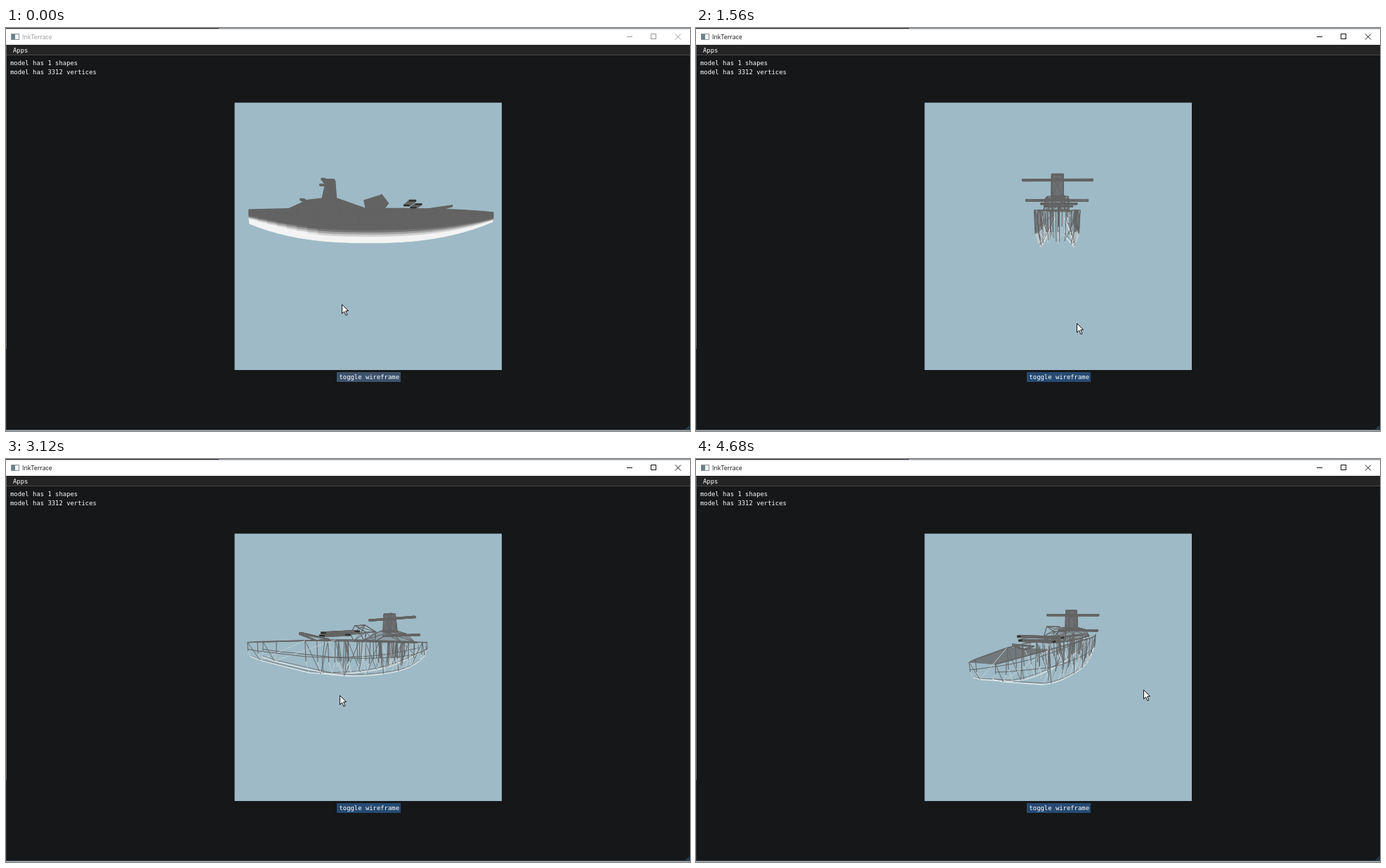
Write an HTML page with a canvas that moves like this. It is 974 px wide and 575 px high and loops after 4.8 s.

```html
<!DOCTYPE html>
<html lang="en">
<head>
<meta charset="utf-8">
<title>Model viewer</title>
<style>
html, body { margin: 0; width: 100%; height: 100%; overflow: hidden; background: #151718; }
canvas { display: block; width: 974px; height: 575px; }
</style>
</head>
<body>
<canvas id="stage" width="974" height="575"></canvas>
<script>
const ctx = document.getElementById('stage').getContext('2d');
const LOOP = 4800, STEP = 120, WIRE_AT = 1320;
const VIEW = [325.5, 106.5, 380.5, 381.5];
const CAM = 400, RAD = Math.PI / 180;
const STERN = -166, BOW = 172;
const GREY = '#636363', DARK = '#2b2b2b', WHITE = '#eef1f1', PALE = '#c3ced2', SKY = '#9ebac6';
const MONO = '8.9px "DejaVu Sans Mono", monospace';
const TITLE = '8.8px "Open Sans", sans-serif';

// Key moments of the drag: time, yaw, pitch, cursor x, cursor y
const KEYS = [
  [0, 0, 0, 478, 394], [960, 63, 4, 544, 326], [1320, 78, 5, 522, 496], [1560, 89, 5.5, 542, 421],
  [2640, 260, 0, 509, 337], [3600, 204, 8, 440, 337], [3840, 160, 9, 380, 412],
  [4200, 230, 10, 560, 351], [4680, 248, 10.5, 637, 329]
];

const clamp = v => Math.max(0, Math.min(1, v));
const mix = (a, b, k) => a + (b - a) * k;
const range = (n, f) => Array.from({ length: n }, (_, i) => f(i));

function poseAt(t) {
  const next = Math.max(1, KEYS.findIndex(k => k[0] >= t));
  const a = KEYS[next - 1], b = KEYS[next], k = (t - a[0]) / (b[0] - a[0]);
  return a.map((v, i) => mix(v, b[i], k));
}

// Point on the hull at length x, drop 0 (deck) to 1 (keel), side -1 to 1
function skin(x, drop, side) {
  const u = x / 170, far = Math.abs(u);
  const deck = -37 + 4 * Math.max(0, u) ** 3;
  const keel = 9 - 28 * far ** 2.4;
  const half = 28 * (1 - (u < 0 ? .7 : .5) * far ** 3);
  return [x, mix(deck, keel, drop), side * half * (1 - .25 * drop ** 4)];
}

// Flat outlines in x, y, pulled out to both sides
const part = (half, pts, fill = 0) => ({ half, pts, fill });
const bar = (x, y, half, len = 5) => part(half, [[x, y], [x + len, y], [x + len, y + 2], [x, y + 2]]);
const WINGS = [[54, -48, 29], [63, -44, 22]];
const PARTS = [
  part(13, [[-112, -37], [-84, -50], [-48, -54], [0, -37]], .2),
  part(7, [[-65, -52], [-59, -80], [-48, -80], [-46, -53]], .6),
  part(9, [[-6, -50], [19, -58], [28, -46], [21, -37], [-3, -37]]),
  part(2, [[78, -38], [119, -44], [119, -42], [97, -36]]),
  bar(-69, -74, 2, 10), bar(-60, -74, 42), bar(-89, -49, 34),
  ...WINGS.map(([x, y, half]) => bar(x, y, half, 9))
];

function faces({ half, pts }) {
  const [a, b] = [-half, half].map(z => pts.map(([x, y]) => [x, y, z]));
  const sides = a.map((p, i) => {
    const j = (i + 1) % a.length;
    return [p, a[j], b[j], b[i]];
  });
  return [a, b, ...sides];
}

function camera(yaw, pitch) {
  const c = Math.cos(yaw * RAD), s = Math.sin(yaw * RAD);
  const cp = Math.cos(pitch * RAD), sp = Math.sin(pitch * RAD);
  return ([x, y, z]) => {
    const depth = z * c - x * s, d = depth * cp - y * sp, k = CAM / (CAM - d);
    return [516 + (x * c + z * s) * k, 297 + (y * cp + depth * sp) * k, d];
  };
}

function trace(pts) {
  ctx.beginPath();
  pts.forEach(p => ctx.lineTo(p[0], p[1]));
  ctx.closePath();
}

function face(pts, color, alpha = 1) {
  trace(pts);
  ctx.globalAlpha = alpha;
  ctx.fillStyle = ctx.strokeStyle = color;
  ctx.lineWidth = .6;
  ctx.fill();
  ctx.stroke();
  ctx.globalAlpha = 1;
}

function line(cam, a, b, color, width = 1) {
  const p = cam(a), q = cam(b);
  ctx.beginPath();
  ctx.moveTo(p[0], p[1]);
  ctx.lineTo(q[0], q[1]);
  ctx.strokeStyle = color;
  ctx.lineWidth = width;
  ctx.stroke();
}

function shade(x, drop) {
  const edge = mix(.42, .6, clamp((x - STERN) / 100));
  const v = Math.round(mix(99, 244, clamp((drop - edge) / .2)));
  return `rgb(${v},${v},${v})`;
}

function drawSolid(cam) {
  for (const p of PARTS) for (const f of faces(p)) face(f.map(cam), GREY);

  const quads = [], rows = 16, cols = 24;
  const add = (pts, color) => {
    const q = pts.map(cam);
    quads.push({ q, color, z: q.reduce((sum, v) => sum + v[2], 0) });
  };
  const across = (x, nx, u, v) => [skin(x, u, -1), skin(nx, v, -1), skin(nx, v, 1), skin(x, u, 1)];
  for (let r = 0; r < rows; r++) {
    const u = r / rows, v = (r + 1) / rows;
    for (const x of [STERN, BOW]) add(across(x, x, u, v), shade(x, u));
    for (let c = 0; c < cols; c++) {
      const x = mix(STERN, BOW, c / cols), nx = mix(STERN, BOW, (c + 1) / cols);
      for (const s of [-1, 1])
        add([skin(x, u, s), skin(nx, u, s), skin(nx, v, s), skin(x, v, s)], shade(x, u));
      if (!r) {
        add(across(x, nx, 0, 0), GREY);
        add(across(x, nx, 1, 1), WHITE);
      }
    }
  }
  quads.sort((a, b) => a.z - b.z).forEach(f => face(f.q, f.color));
}

const FRAMES = [STERN, STERN + 10, -125, ...range(10, i => -88 + 20 * i), BOW - 12, BOW];

function drawWire(cam) {
  const draw = (...args) => line(cam, ...args);
  const foredeck = [skin(88, 0, -1), skin(BOW, 0, -1), skin(BOW, 0, 1), skin(88, 0, 1)];
  face(foredeck.map(cam), GREY, .75);

  FRAMES.forEach((x, i) => {
    const nx = FRAMES[i + 1];
    for (const s of [-1, 1]) {
      draw(skin(x, 0, s), skin(x, .65, s), GREY);
      draw(skin(x, .65, s), skin(x, 1, s), PALE);
      if (nx === undefined) continue;
      const up = i % 2;
      draw(skin(x, 0, s), skin(nx, 0, s), GREY, 1.6);
      draw(skin(x, .5, s), skin(nx, .5, s), GREY);
      draw(skin(x, .95, s), skin(nx, .95, s), GREY, .7);
      draw(skin(x, 1, s), skin(nx, 1, s), WHITE, 1.1);
      draw(skin(x, up, s), skin(nx, 1 - up, s), i % 3 ? GREY : PALE, .9);
    }
  });

  // Crowded ribs below the tower and the forward mount
  let seed = 7;
  const rnd = () => (seed = seed * 16807 % 2147483647) / 2147483647;
  for (let i = 0; i < 30; i++) {
    const x = i < 22 ? mix(-92, -44, rnd()) : mix(46, 66, rnd());
    const s = mix(-1, 1, rnd()), lean = mix(-7, 7, rnd());
    draw(skin(x, 0, s), skin(x + lean, .6, s), GREY);
    draw(skin(x + lean, .6, s), skin(x + lean * 1.4, mix(.7, 1, rnd()), s), i % 2 ? PALE : GREY, .9);
  }

  for (const p of PARTS) for (const f of faces(p)) {
    if (p.fill) face(f.map(cam), GREY, p.fill);
    f.forEach((v, i) => {
      draw(v, f[(i + 1) % f.length], GREY);
      draw(f[0], v, GREY);
    });
  }
}

function drawTips(cam) {
  for (const [x, y, half] of WINGS) for (const z of [-half, half])
    line(cam, [x, y + 1, z], [x + 9, y + 1, z], DARK, 2.2);
}

function box(x, y, w, h, color) {
  ctx.fillStyle = color;
  ctx.fillRect(x, y, w, h);
}

function label(str, x, y, color = '#fff', font = MONO) {
  ctx.font = font;
  ctx.fillStyle = color;
  ctx.fillText(str, x, y);
}

function drawWindow(t) {
  const active = t >= 240, hover = t >= 1200 && t < 1440;
  const ink = active ? '#111' : '#999';
  box(0, 0, 974, 575, '#151718');
  box(0, 0, 974, 2, '#8f9499');
  box(0, 0, 303, 1, '#20222a');
  box(0, 1.5, 974, 22.5, '#fff');
  box(0, 24, 974, 14, '#242424');
  box(0, 38, 974, 1, '#47494c');
  box(0, 25, 1, 433, '#686c70');
  box(0, 458, 1, 115, '#2a3138');
  box(0, 573, 974, 1, '#5a6066');
  box(0, 574, 974, 1, '#b0bac0');

  box(7, 8, 12, 9, '#8b9298');
  box(8, 9, 10, 7, '#f4f6f7');
  box(8, 9, 5, 7, '#68808c');
  label('InkTerrace', 23, 16, ink, TITLE);
  ctx.strokeStyle = ink;
  ctx.lineWidth = 1;
  ctx.strokeRect(918.5, 8.5, 7, 7);
  ctx.beginPath();
  ctx.moveTo(884, 12.5); ctx.lineTo(892, 12.5);
  ctx.moveTo(953, 8.5); ctx.lineTo(961, 16.5);
  ctx.moveTo(961, 8.5); ctx.lineTo(953, 16.5);
  ctx.stroke();

  label('Apps', 10, 35);
  label('model has 1 shapes', 6, 52.5);
  label('model has 3312 vertices', 6, 65.5);
  face([[973, 567], [973, 573], [967, 573]], '#26394d');
  box(...VIEW, SKY);
  box(471, 491, 91, 14, hover ? '#4296fa' : active ? '#264a72' : '#3d526b');
  label('toggle wireframe', 474.5, 501);
}

function drawCursor(x, y) {
  ctx.save();
  ctx.translate(Math.round(x) + .5, Math.round(y) + .5);
  trace([[0, 0], [0, 13], [3, 10], [5.5, 15.5], [7.5, 14.5], [5.2, 9.3], [9, 9]]);
  ctx.fillStyle = '#fff';
  ctx.strokeStyle = '#111';
  ctx.lineWidth = 1;
  ctx.fill();
  ctx.stroke();
  ctx.restore();
}

function draw(now) {
  const t = Math.floor(now % LOOP / STEP) * STEP;
  const [, yaw, pitch, mx, my] = poseAt(t), cam = camera(yaw, pitch);
  drawWindow(t);
  ctx.save();
  ctx.beginPath();
  ctx.rect(...VIEW);
  ctx.clip();
  (t < WIRE_AT ? drawSolid : drawWire)(cam);
  drawTips(cam);
  ctx.restore();
  drawCursor(mx, my);
}

let start;
function tick(now) {
  start ??= now;
  draw(now - start);
  requestAnimationFrame(tick);
}
draw(0);
requestAnimationFrame(tick);
</script>
</body>
</html>
```
